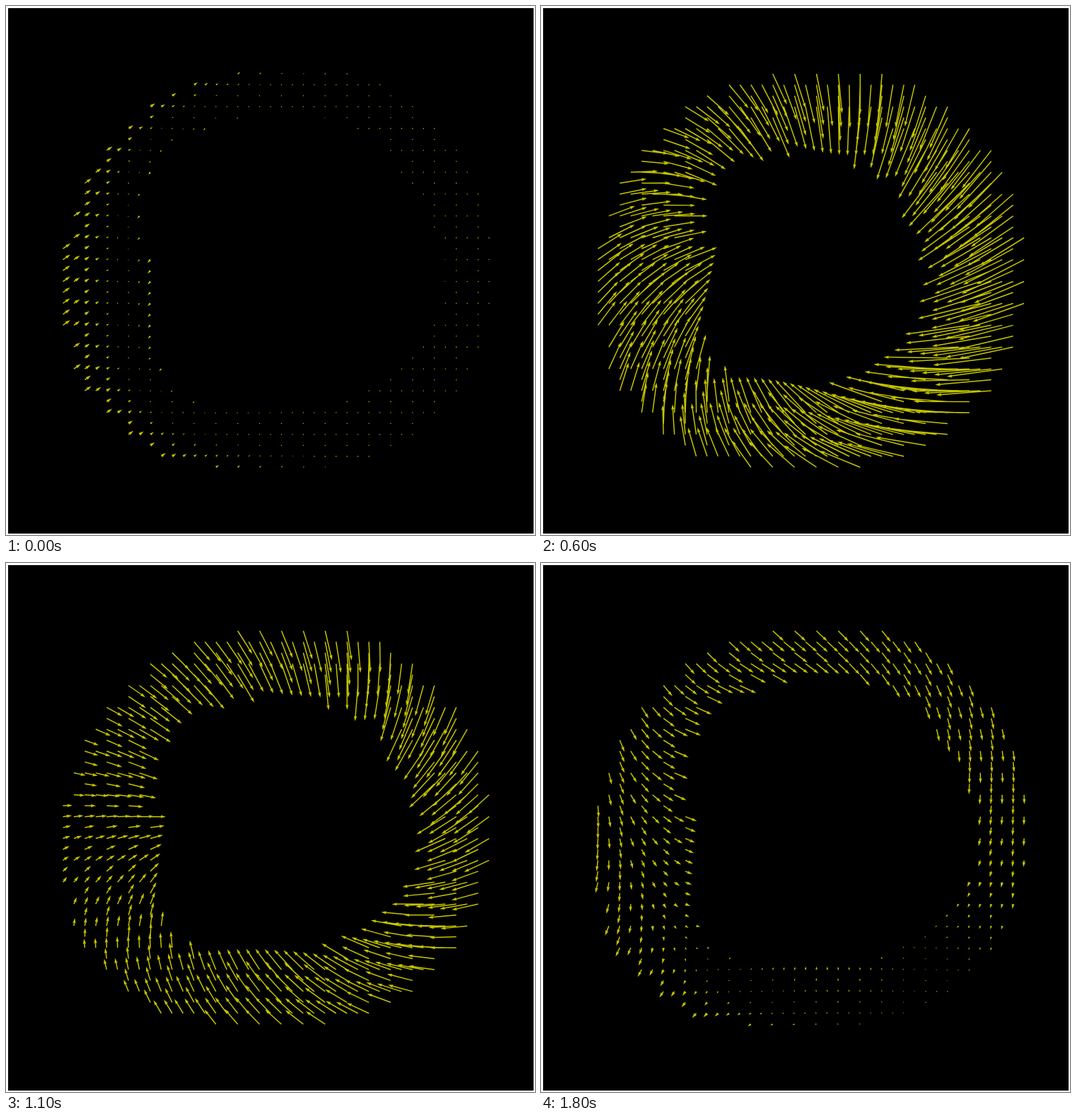
Animation, 748 px wide and 748 px high, one loop 1.9 s. Source, as an HTML page with a canvas:

```html
<!DOCTYPE html>
<html lang="en">
<head>
<meta charset="utf-8">
<title>Ring displacement field</title>
<style>
  html, body { margin: 0; width: 100%; height: 100%; overflow: hidden; background: #fff; }
  canvas { display: block; width: 748px; height: 748px; }
</style>
</head>
<body>
<canvas id="stage" width="748" height="748"></canvas>
<script>
const ctx = document.getElementById('stage').getContext('2d');
const LOOP = 1900, STEP = 100;
const GRID = { x: 80.5, y: 96, gap: 15.45, cols: 40, rows: 37 };
const CENTER = { x: 382, y: 374 };
const WIDTH = 1.484;

// The motion is a few whole-ring modes, each keyed at these times
const TIMES = [0, 400, 700, 900, 1100, 1500, 1800];
const MODES = {
  shiftX: [0, -9.3, -22, -22, -7, .6, 6],
  shiftY: [0, 7, 7.5, 8, 9, 8, 8.2],
  squeeze: [1, 43.4, 64.7, 60.8, 34, 9, 7.6],
  twist: [0, 24, 28.3, 23.5, 16, 10.5, 5],
  shearX: [-.5, -3.2, -4.4, -3.3, 3.2, 2.5, 1.5],
  shearY: [0, -.4, 0, -1, -3.6, -4.9, -4.2],
  bend: [0, .3, -2.7, -7.2, -4, -2.4, -2.2],
  fold: [0, -1.4, -3.2, -1.3, .8, 1.9, 2.5],
  roll: [1, .2, .4, .4, 0, -.4, -.9],
};

const { sin, cos, hypot, atan2, min, max, floor, PI } = Math;

function hermite(a, b, ma, mb, u) {
  const u2 = u * u, u3 = u2 * u;
  return a * (2 * u3 - 3 * u2 + 1) + b * (3 * u2 - 2 * u3) + ma * (u3 - 2 * u2 + u) + mb * (u3 - u2);
}

// Smooth curve through the keys, flat at both ends
function curve(keys, time) {
  const last = TIMES.length - 1;
  const i = max(0, TIMES.findIndex(t => t >= time) - 1);
  const span = TIMES[i + 1] - TIMES[i];
  const slope = j => j % last ? (keys[j + 1] - keys[j - 1]) / (TIMES[j + 1] - TIMES[j - 1]) * span : 0;
  return hermite(keys[i], keys[i + 1], slope(i), slope(i + 1), (time - TIMES[i]) / span);
}

// Ring walls: radius plus cosine and sine harmonics
const wave = (a, base, ...parts) =>
  parts.reduce((sum, [c, s], n) => sum + c * cos((n + 1) * a) + s * sin((n + 1) * a), base);
const innerWall = a => wave(a, 214, [15.3, -8.9], [-1.3, 0], [10.8, 1.8], [-6.3, 3.5], [4.5, 0]);
const outerWall = a => wave(a, 302, [0, 2.7], [10, -6], [0, 3], [-6, 0]);

const points = [];
for (let r = 0; r < GRID.rows; r++) {
  for (let c = 0; c < GRID.cols; c++) {
    if (r % 2 === 0 && c % 2) continue;
    const x = GRID.x + c * GRID.gap, y = GRID.y + r * GRID.gap;
    const dx = x - CENTER.x, dy = y - CENTER.y;
    const angle = atan2(dy, dx), dist = hypot(dx, dy);
    const near = innerWall(angle), far = outerWall(angle);
    if (dist < near || dist > far) continue;
    points.push({ x, y, angle, depth: (dist - near - 5) / (far - near - 10) });
  }
}

function displacement(m, a, depth) {
  const c = cos(a), s = sin(a), c2 = cos(2 * a), s2 = sin(2 * a);
  const squeeze = m.squeeze * (1 - .24 * depth);
  const roll = m.roll * (depth - .36) * ((1 - c) / 2) ** 2;
  return [
    m.shiftX - squeeze * c - m.twist * s + m.shearX * c + m.shearY * s + m.bend * c2 + m.fold * s2 + 14 * roll,
    m.shiftY - squeeze * s + m.twist * c + m.shearY * c - m.shearX * s + m.bend * s2 + m.fold * c2 - 11 * roll,
  ];
}

function polygon(corners) {
  corners.forEach(([x, y], k) => k ? ctx.lineTo(x, y) : ctx.moveTo(x, y));
  ctx.closePath();
}

function arrow(x, y, dx, dy) {
  const size = hypot(dx, dy) / WIDTH;
  if (size < 1) {
    const dot = [0, 1, 2, 3, 4, 5].map(k => k * PI / 3);
    polygon(dot.map(a => [x + WIDTH / 2 * cos(a), y + WIDTH / 2 * sin(a)]));
    return;
  }
  // Arrows shorter than their head shrink as a whole
  const scale = min(1, size / 5) / size, n = max(size, 5);
  const ux = dx * scale, uy = dy * scale;
  const shape = [[0, -.5], [n - 4.5, -.5], [n - 5, -1.5], [n, 0], [n - 5, 1.5], [n - 4.5, .5], [0, .5]];
  polygon(shape.map(([p, q]) => [x + p * ux - q * uy, y + p * uy + q * ux]));
}

function draw(time) {
  const modes = {};
  for (const name in MODES) modes[name] = curve(MODES[name], time);
  ctx.fillStyle = '#fff';
  ctx.fillRect(0, 0, 748, 748);
  ctx.fillStyle = '#000';
  ctx.fillRect(3, 3, 743, 743);
  ctx.fillStyle = '#c4c400';
  ctx.beginPath();
  for (const { x, y, angle, depth } of points) arrow(x, y, ...displacement(modes, angle, depth));
  ctx.fill();
}

const origin = performance.now();
let shown = -1;
function tick() {
  const step = floor((performance.now() - origin) % LOOP / STEP);
  if (step !== shown) draw((shown = step) * STEP);
  requestAnimationFrame(tick);
}
tick();
</script>
</body>
</html>
```
